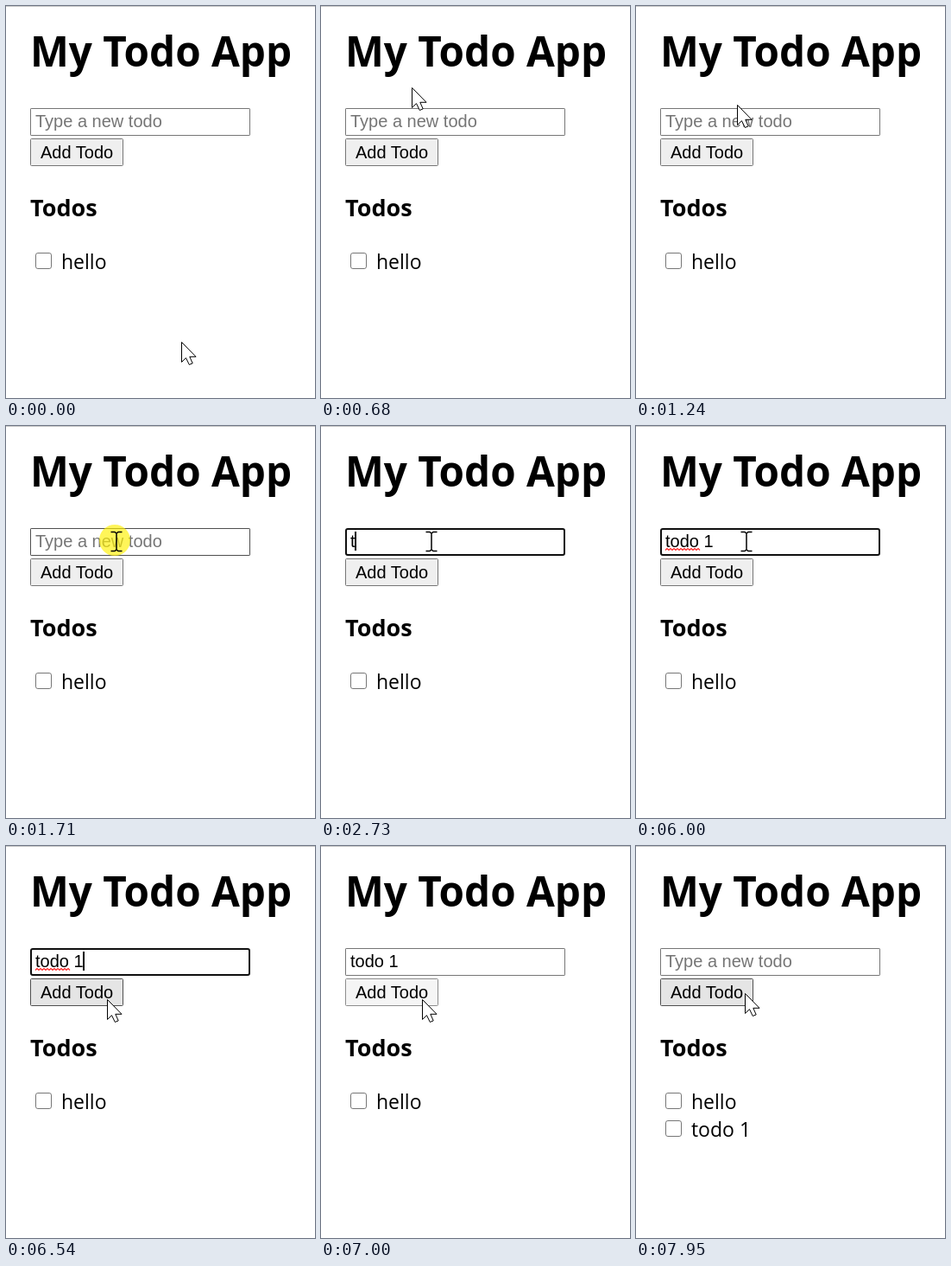
An HTML page for the animation above (8 s loop, 358x453 px).

```html
<!DOCTYPE html>
<html lang="en">
<head>
<meta charset="utf-8">
<title>My Todo App</title>
<style>
  html, body { margin: 0; height: 100%; overflow: hidden; background: #fff; }
  svg { display: block; width: 100%; height: 100%; }
  text { white-space: pre; font-family: "Open Sans", "Noto Sans", sans-serif; }
  .bold { font-weight: 700; }
  .item { font-size: 23px; }
  .form { font: 20px "Liberation Sans", Arial, sans-serif; }
  .check { fill: #fff; stroke: #767676; }
</style>
</head>
<body>
<svg viewBox="0 0 358 453">
  <rect width="358" height="1" fill="#c8c8c8"/>
  <text class="bold" x="28" y="70" font-size="47.6">My Todo App</text>

  <rect id="field" fill="#fff"/>
  <text id="value" class="form" x="34" y="140"></text>
  <path id="squiggle" fill="none" stroke="#f22" stroke-width="1.2"/>
  <rect id="caret" width="2" height="22"/>

  <rect id="button" x="28.5" y="153.5" width="107" height="31" rx="1"/>
  <text class="form" x="40" y="176">Add Todo</text>

  <text class="bold" x="28" y="242.5" font-size="27">Todos</text>
  <rect class="check" x="34.5" y="285.5" width="18" height="18" rx="2.4"/>
  <text class="item" x="64" y="303.5">hello</text>
  <g id="added">
    <rect class="check" x="34.5" y="317.5" width="18" height="18" rx="2.4"/>
    <text class="item" x="64" y="335.5">todo 1</text>
  </g>

  <circle id="click" cx="126" cy="132" r="18" fill="#fff000" opacity=".65"/>
  <path id="arrow" d="M.5 .5V23.5L5.5 18.7 9.3 26.5 13.2 24.9 9.8 17.3H17z" fill="#fff" stroke="#000"/>
  <path id="beam" d="M-6.5-11h4.5l2 1.5 2-1.5h4.5M0-9.5V9.5M-6.5 11h4.5l2-1.5 2 1.5h4.5"
        fill="none" stroke="#000" stroke-width="1.5"/>
</svg>
<script>
const LOOP = 8000;
const $ = id => document.getElementById(id);
const set = (id, attrs) => {
  for (const k in attrs) $(id).setAttribute(k, attrs[k]);
};
const show = (id, on) => set(id, { visibility: on ? 'visible' : 'hidden' });

// pointer moves: first step, last step, number of steps, end x, end y
const moves = [
  [70, 70, 1, 177, 351],
  [210, 310, 3, 209, 263],
  [540, 680, 3, 105, 94],
  [1050, 1480, 8, 128, 133.5],
  [6230, 6540, 5, 117, 177],
  [7950, 7950, 1, 126, 170]
];
// typed characters and the caret position after each
const keys = [
  [2730, 't', 39], [3130, 'to', 50], [3510, 'tod', 61],
  [3970, 'todo', 72], [4360, 'todo ', 78], [5520, 'todo 1', 89]
];
const caretOff = [[2350, 2730], [4820, 5370], [6000, 6540]];
const FOCUS = 1800, BLUR = 6980, PRESS = 7000, ADD = 7080;

const between = (t, a, b) => t >= a && t < b;

function pointer(t) {
  let x = 203, y = 388;
  for (const [start, end, n, toX, toY] of moves) {
    if (t < start) break;
    const gap = (end - start) / Math.max(1, n - 1);
    const done = t >= end ? 1 : (Math.floor((t - start) / gap) + 1) / n;
    x += (toX - x) * done;
    y += (toY - y) * done;
  }
  return [x, y];
}

function draw(t) {
  const [x, y] = pointer(t);
  const overField = between(x, 28, 283) && between(y, 118, 150);
  const overButton = between(x, 28, 136) && between(y, 153, 185);
  const focused = between(t, FOCUS, BLUR);
  const key = t < ADD && keys.filter(k => t >= k[0]).pop();

  const edge = focused ? 1 : .5;
  set('field', {
    x: 28 + edge, y: 118 + edge, width: 255 - 2 * edge, height: 32 - 2 * edge,
    rx: focused ? 2 : .6,
    stroke: focused ? '#101010' : overField ? '#4f4f4f' : '#767676',
    'stroke-width': 2 * edge
  });
  $('value').textContent = key ? key[1] : 'Type a new todo';
  set('value', { fill: key ? '#000' : '#757575' });
  set('caret', { x: key ? key[2] : 34, y: key ? 122 : 123 });
  show('caret', focused && !caretOff.some(([a, b]) => between(t, a, b)));
  show('squiggle', between(t, 4820, BLUR));

  const [fill, stroke] = between(t, PRESS, ADD) ? ['#f5f5f5', '#8d8d8d']
    : overButton ? ['#e5e5e5', '#4f4f4f'] : ['#efefef', '#767676'];
  set('button', { fill, stroke });
  show('added', t >= ADD);

  show('click', between(t, 1710, 1880));
  const at = `translate(${Math.round(x)} ${overField ? y : Math.round(y)})`;
  set('arrow', { transform: at });
  set('beam', { transform: at });
  show('arrow', !overField);
  show('beam', overField);
}

set('squiggle', { d: 'M34 143.5' + 'l2-2 2 2'.repeat(10) });

const began = performance.now();
function tick() {
  draw((performance.now() - began) % LOOP);
  requestAnimationFrame(tick);
}
draw(0);
requestAnimationFrame(tick);
</script>
</body>
</html>
```
